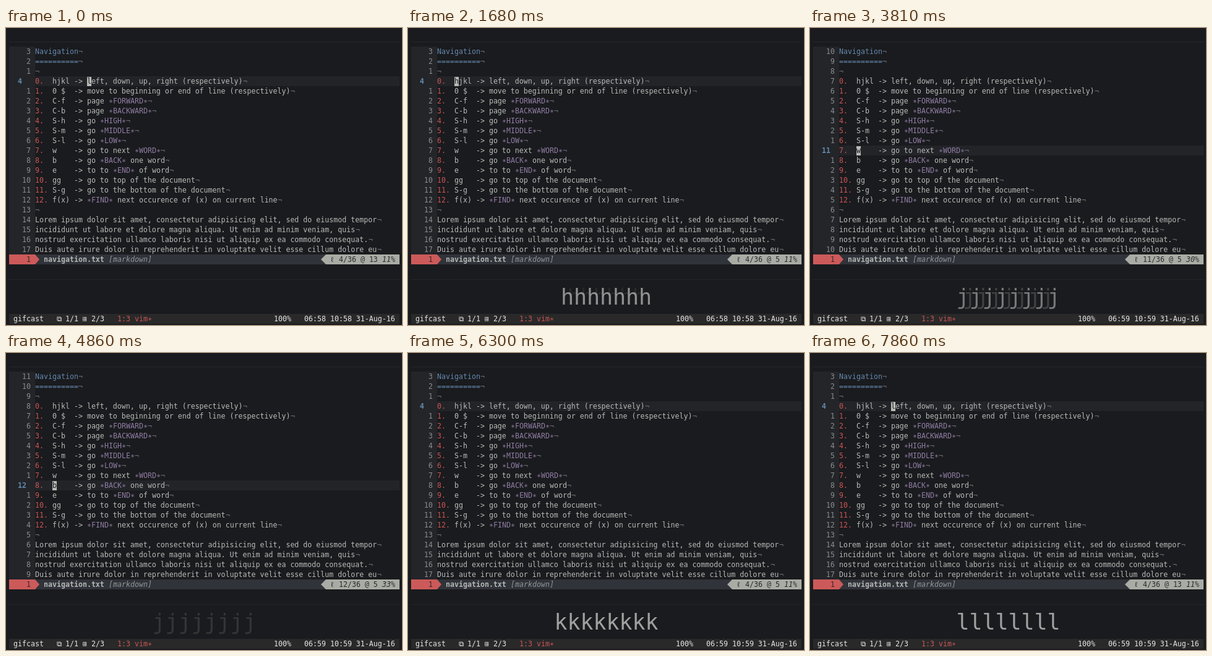
An HTML page with a canvas for the animation above (8000 ms loop, 640 px wide and 480 px high).

```html
<!DOCTYPE html>
<html lang="en">
<head>
<meta charset="utf-8">
<title>Navigation</title>
<style>
html, body { margin: 0; width: 100%; height: 100%; overflow: hidden; background: #1a1b1e; }
canvas { display: block; }
</style>
</head>
<body>
<canvas id="stage" width="640" height="480"></canvas>
<script>
const g = document.getElementById('stage').getContext('2d');
const LOOP = 8000, CW = 7, LH = 16, LEFT = 47, TOP = 30, TOTAL = 36;
const FACE = '"DejaVu Sans Mono", monospace', SIZE = 11.628;
const C = {
  bg: '#1a1b1e', gutter: '#232529', row: '#222428', rule: '#26272b', text: '#b9bbb8',
  dim: '#6c7076', num: '#898d90', blue: '#6488ad', red: '#cb5555', purple: '#8f7ca3',
  block: '#cc5a5a', status: '#303339', light: '#a9aca4', bar: '#292929', white: '#e6e6e6'
};
const lines = `Navigation
==========

0.  hjkl -> left, down, up, right (respectively)
1.  0 $  -> move to beginning or end of line (respectively)
2.  C-f  -> page *FORWARD*
3.  C-b  -> page *BACKWARD*
4.  S-h  -> go *HIGH*
5.  S-m  -> go *MIDDLE*
6.  S-l  -> go *LOW*
7.  w    -> go to next *WORD*
8.  b    -> go *BACK* one word
9.  e    -> to to *END* of word
10. gg   -> go to top of the document
11. S-g  -> go to the bottom of the document
12. f(x) -> *FIND* next occurence of (x) on current line

Lorem ipsum dolor sit amet, consectetur adipisicing elit, sed do eiusmod tempor
incididunt ut labore et dolore magna aliqua. Ut enim ad minim veniam, quis
nostrud exercitation ullamco laboris nisi ut aliquip ex ea commodo consequat.
Duis aute irure dolor in reprehenderit in voluptate velit esse cillum dolore eu`.split('\n');

// Key runs: eight presses each; the caption keeps its own start and fade time.
const runs = [
  { key: 'h', dx: -1, dy: 0, start: 895, gap: 111, caption: 953, fade: 2580 },
  { key: 'j', dx: 0, dy: 1, start: 3040, gap: 113, caption: 2970, fade: 4620 },
  { key: 'k', dx: 0, dy: -1, start: 5130, gap: 103, caption: 5070, fade: 6720 },
  { key: 'l', dx: 1, dy: 0, start: 7180, gap: 92, caption: 7140, fade: 9000 }
];
const clamp = (v, a, b) => Math.min(b, Math.max(a, v));
const presses = (t, start, gap) => clamp(Math.floor((t - start) / gap) + 1, 0, 8);

function rect(x, y, w, h, color) {
  g.fillStyle = color;
  g.fillRect(x, y, w, h);
}

function arrow(x, tip, y, color) {
  g.fillStyle = color;
  g.beginPath();
  g.moveTo(x, y);
  g.lineTo(tip, y + LH / 2);
  g.lineTo(x, y + LH);
  g.fill();
}

function text(s, x, y, color, style = '') {
  g.font = `${style} ${SIZE}px ${FACE}`;
  g.fillStyle = color;
  g.fillText(s.replaceAll('*', '∗'), x, y);
}

function drawLine(s, y) {
  let x = LEFT;
  for (const part of s.split(/(^\d+\.|\*[A-Z]+\*)/)) {
    const color = /^\d+\.$/.test(part) ? C.red : part[0] === '*' ? C.purple : C.text;
    text(part, x, y, color);
    x += part.length * CW;
  }
  text('¬', x, y, C.dim);
}

function drawEditor(line, col, cursorOn) {
  rect(5, TOP, LEFT - 5, 21 * LH, C.gutter);
  rect(LEFT, TOP + (line - 1) * LH, 636 - LEFT, LH, C.row);
  lines.forEach((s, i) => {
    const y = TOP + 12 + i * LH, away = Math.abs(i + 1 - line);
    if (away) {
      const label = String(away);
      text(label, 40 - label.length * CW, y, C.num);
    } else text(String(line), 19, y, C.blue, 'bold');
    if (i < 2) {
      text(s, LEFT, y, C.blue);
      text('¬', LEFT + s.length * CW, y, C.dim);
    } else drawLine(s, y);
  });
  if (cursorOn) {
    const x = LEFT + (col - 1) * CW, y = TOP + (line - 1) * LH;
    rect(x, y + 49 - 48, CW, 15, '#b8bab5');
    text(lines[line - 1][col - 1], x, y + 12, C.bg);
  }
}

function drawStatus(line, col) {
  const y = 366, base = 378;
  rect(LEFT, y, 636 - LEFT, LH, C.status);
  rect(5, y, LEFT - 5, LH, C.block);
  arrow(LEFT, 54, y, C.block);
  text('1', 33, base, '#3a2426');
  text('navigation.txt', 61, base, '#b4b7b5', 'bold');
  text('[markdown]', 166, base, '#92979a', 'italic');
  const place = `ℓ ${line}/${TOTAL} @ ${col} `;
  const x = 608 - place.length * CW;
  rect(x - 7, y, 636 - x + 7, LH, C.light);
  arrow(x - 7, x - 15, y, C.light);
  text(place, x, base, '#292b2e');
  text(Math.floor(100 * line / TOTAL) + '%', 608, base, '#292b2e', 'italic');
}

function drawBar(t) {
  const min = t < 2070 ? 58 : 59, y = 474;
  rect(5, 462, 631, LH, C.bar);
  text('gifcast', 12, y, C.white);
  text('⧉', 82, y, C.white);
  text('1/1', 96, y, C.white);
  text('⊞', 124, y, C.white);
  text('2/3', 138, y, C.white);
  text('1:3 vim*', 180, y, C.red);
  text('100%', 433, y, C.white);
  text(`06:${min} 10:${min} 31-Aug-16`, 482, y, C.white);
}

function drawCaption(t) {
  g.font = `${SIZE * 3}px ${FACE}`;
  g.fillStyle = '#a0a1a0';
  g.textAlign = 'center';
  for (const r of runs) {
    const n = presses(t, r.caption, r.gap);
    const out = clamp((r.fade + 300 - t) / 300, 0, 1);
    if (!n || !out) continue;
    const mix = clamp((t - r.caption - (n - 1) * r.gap) / 70, 0, 1);
    const show = (count, alpha) => {
      g.globalAlpha = alpha * out;
      g.fillText(r.key.repeat(count), 320.5, 447);
    };
    show(n - 1, 1 - mix);
    show(n, mix);
  }
  g.globalAlpha = 1;
  g.textAlign = 'left';
}

function draw(now) {
  const t = now % LOOP;
  let line = 4, col = 13, last = -1000;
  for (const r of runs) {
    const n = presses(t, r.start, r.gap);
    line += r.dy * n;
    col += r.dx * n;
    if (n) last = r.start + (n - 1) * r.gap;
  }
  const blinkOff = t > 475 && (t - 475) % 970 < 420 && t - last > 400;
  rect(0, 0, 640, 480, C.bg);
  rect(5, 22, 631, 1, C.rule);
  rect(5, 406, 631, 1, C.rule);
  drawEditor(line, col, !blinkOff);
  drawStatus(line, col);
  drawCaption(t);
  drawBar(t);
}

const begin = performance.now();
function frame() {
  draw(performance.now() - begin);
  requestAnimationFrame(frame);
}
frame();
</script>
</body>
</html>
```
